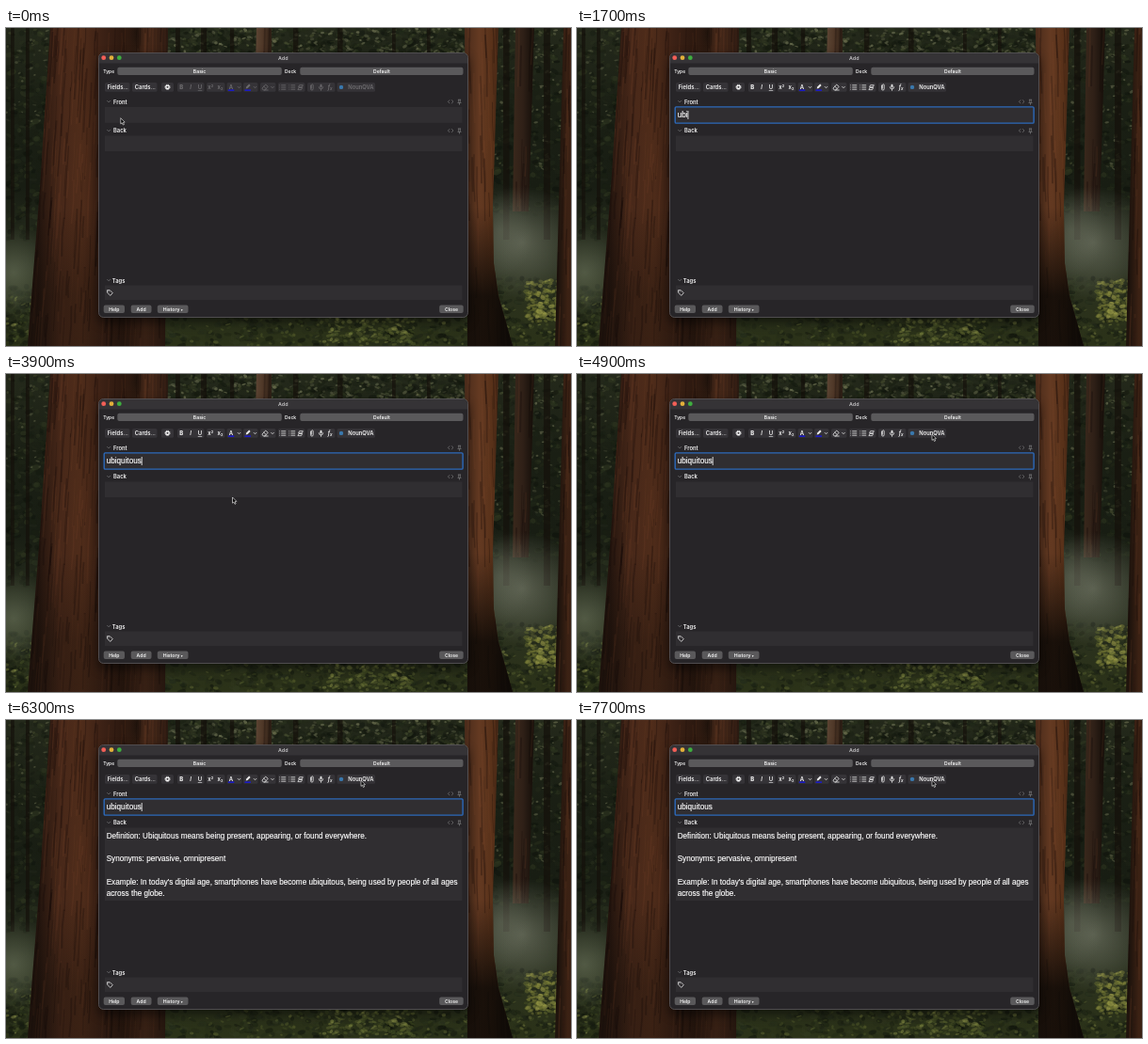
These frames come from a looping animation (600 by 338 pixels, 8 s). An HTML page with a canvas:

```html
<!DOCTYPE html>
<html lang="en">
<head>
<meta charset="utf-8">
<title>Add card</title>
<style>
  html, body { margin: 0; width: 100%; height: 100%; overflow: hidden; background: #171c12; }
  canvas, svg { position: absolute; left: 0; top: 0; width: 600px; height: 338px; }
  text { font-family: Inter, "Open Sans", sans-serif; font-weight: 600; fill: #f4f4f4; white-space: pre; }
  .small { font-size: 5.1px; }
  .label { font-size: 5.8px; }
  .mid { text-anchor: middle; }
  .edit { font-family: "Liberation Sans", Arial, sans-serif; font-weight: 400; font-size: 8.15px; fill: #fff; stroke: #fff; stroke-width: .15; }
  .line { fill: none; stroke: #e8e8e8; stroke-width: .8; stroke-linecap: round; stroke-linejoin: round; }
  .dim { stroke: #7c7b7d; stroke-width: .7; }
  .button { fill: #5a595b; }
  .tool { fill: #353337; }
  .field { fill: #302e31; }
</style>
</head>
<body>
<canvas id="forest" width="600" height="338"></canvas>
<svg viewBox="0 0 600 338" xmlns="http://www.w3.org/2000/svg">
  <defs>
    <filter id="shadow" x="-10%" y="-10%" width="120%" height="125%">
      <feGaussianBlur stdDeviation="6"/>
    </filter>
    <path id="section" class="line dim" d="M107.6 -2.9l1.5 1.5 1.5-1.5"/>
    <g id="fieldIcons" class="line dim">
      <path d="M471 -3.7l-1.6 1.6 1.6 1.6M473.4 -3.7l1.6 1.6-1.6 1.6"/>
      <path d="M480.3 -4.2h2.4M480.7 -4v2l-.9 1.2h3.4l-.9-1.2v-2M481.5 -.7v1.7"/>
    </g>
    <path id="drop" d="M-1.3 -.6L0 .7 1.3 -.6" class="line"/>
  </defs>

  <rect x="98" y="31" width="393" height="282" rx="6" fill="#000" opacity=".55" filter="url(#shadow)"/>
  <rect x="98.5" y="26.5" width="392" height="281" rx="5" fill="#272528" stroke="#5c5a5d" stroke-width=".8"/>
  <path d="M99 37.5V31.5a4.6 4.6 0 0 1 4.6-4.6H485.4a4.6 4.6 0 0 1 4.6 4.6V37.5z" fill="#353336"/>
  <circle cx="103.7" cy="31.7" r="2.4" fill="#f35f57"/>
  <circle cx="112" cy="31.7" r="2.4" fill="#e3b03a"/>
  <circle cx="120.3" cy="31.7" r="2.4" fill="#3fae3f"/>
  <text class="mid" x="294.3" y="33.9" font-size="5.3" style="fill:#c4c3c5">Add</text>

  <text x="103.3" y="47.8" font-size="4.9">Type</text>
  <text x="296" y="47.8" font-size="4.9">Deck</text>
  <g id="buttons"></g>

  <g id="toolBacks"></g>
  <text class="label" x="107.7" y="65.2">Fields...</text>
  <text class="label" x="136.8" y="65.2">Cards...</text>
  <circle cx="171.5" cy="62.8" r="1.7" fill="none" stroke="#fff" stroke-width="1.3"/>
  <circle cx="171.5" cy="62.8" r="2.6" fill="none" stroke="#fff" stroke-dasharray="1.02"/>

  <g id="tools">
    <g font-size="6">
      <text class="mid" x="186.2" y="65" style="font-weight:800">B</text>
      <text class="mid" x="196.2" y="65" font-style="italic">I</text>
      <text class="mid" x="206" y="65" text-decoration="underline">U</text>
      <text x="214.3" y="65.3">x<tspan dy="-2" font-size="4">2</tspan></text>
      <text x="224.5" y="64.8">x<tspan dy="1.3" font-size="4">2</tspan></text>
      <text class="mid" x="239" y="64.5">A</text>
      <text x="341.7" y="65" font-style="italic">f<tspan dy=".9" font-size="4.5">x</tspan></text>
    </g>
    <use href="#drop" x="247.5" y="63"/>
    <use href="#drop" x="264.5" y="63"/>
    <use href="#drop" x="283" y="63"/>
    <path d="M254.700 64.400l.5-1.800 3-3 1.400 1.400-3 3z" fill="#e8e8e8"/>
    <path class="line" d="M272.200 63.800l3.500-3.700 2.500 2.200-3.300 3.700h-1.300zM273.800 62.200l2.400 2.300M274.500 66h3.700"/>
    <path class="line" d="M292.600 60.800h4.200M292.600 63h4.200M292.600 65.200h4.200M302.800 60.800h4M302.800 63h4M302.800 65.200h4"/>
    <path class="line" d="M312 60.700h3.300l-1 2.100h-3.300zM311.300 63.500h3.300l-1 2.100h-3.300z"/>
    <path class="line" stroke-dasharray="0 2.200" d="M290.700 60.800v4.500M300.800 60.800v4.500"/>
    <path class="line" d="M323.500 61v3.700a1.300 1.300 0 0 0 2.700 0v-4a.9.900 0 0 0-1.800 0v3.600"/>
    <rect x="333.500" y="59.800" width="2" height="3.800" rx="1" fill="#e4e4e4"/>
    <path class="line" d="M332.300 62.700a2.200 2.200 0 0 0 4.400 0M334.500 65v1.300"/>
    <text class="label" x="363.3" y="65.1">NounQVA</text>
  </g>
  <path d="M235.800 66.200h6.500M253.500 66.200h6.500" stroke="#1414f0" stroke-width="1.200"/>
  <circle cx="356" cy="62.900" r="2.200" fill="#3a78ad"/>

  <use href="#section" y="80.300"/>
  <use href="#fieldIcons" y="80.400"/>
  <text class="label" x="114" y="80.500">Front</text>
  <rect class="field" x="105" y="84" width="379.500" height="16.800"/>
  <rect id="focusRing" x="104.200" y="83.900" width="380.900" height="17.200" rx="1.200" fill="none" stroke="#2c6abb" stroke-width="1.400"/>
  <text id="word" class="edit" x="106.700" y="95.300"></text>
  <rect id="caret" y="88" width=".8" height="9" fill="#fff"/>

  <use href="#section" y="111.200"/>
  <use href="#fieldIcons" y="111.200"/>
  <text class="label" x="114" y="111.200">Back</text>
  <rect id="backField" class="field" x="105" y="114.500" width="379.500"/>
  <g id="answer"></g>

  <use href="#section" y="270.200"/>
  <text class="label" x="112.800" y="270.500">Tags</text>
  <rect class="field" x="105" y="273.500" width="379.500" height="15.500"/>
  <path class="line" d="M107.800 278.700h2.500l3 3-2.600 2.700-2.900-3zM109 279.900h.1"/>

  <path id="mouse" d="M0 0V6.200L1.400 5l1.100 2.300 1.100-.5L2.600 4.600 4.400 4.400z" fill="#080808" stroke="#fff" stroke-width=".6" stroke-linejoin="round"/>
</svg>

<script>
const byId = id => document.getElementById(id);
const WORD = "ubiquitous";
const ANSWER = [
  [126, "Definition: Ubiquitous means being present, appearing, or found everywhere."],
  [150.3, "Synonyms: pervasive, omnipresent"],
  [174.6, "Example: In today's digital age, smartphones have become ubiquitous, being used by people of all ages"],
  [186.8, "across the globe."]
];
const LOOP = 8000, FOCUS = 600, TYPE_START = 1420, TYPE_STEP = 133, ANSWERED = 5800;
const TYPE_END = TYPE_START + TYPE_STEP * (WORD.length - 1);
const BLINK = 1060;

// Static window parts
const button = (x, y, w, label) =>
  `<rect class="button" x="${x}" y="${y}" width="${w}" height="8.4" rx="2"/>` +
  `<text class="small mid" x="${x + w / 2}" y="${y + 6.1}">${label}</text>`;
byId("buttons").innerHTML =
  button(118.3, 41.7, 174.5, "Basic") + button(312.3, 41.7, 173.2, "Default") +
  button(103.7, 294.5, 22.3, "Help") + button(132.7, 294.5, 21.8, "Add") +
  button(160.8, 294.5, 32.7, 'History <tspan font-size="3.5">▾</tspan>') +
  button(460.2, 294.5, 25.5, "Close");
byId("toolBacks").innerHTML = [[105, 26.5], [134, 26.5], [165, 13], [182, 28.5], [213, 19.5],
  [234.5, 16], [252, 15.5], [270, 16.5], [289, 28.5], [320, 29.5], [351.5, 40.5]]
  .map(([x, w]) => `<rect class="tool" x="${x}" y="58" width="${w}" height="9.8" rx="1.6"/>`).join("");
byId("answer").innerHTML = ANSWER
  .map(([y, line]) => `<text class="edit" x="106.7" y="${y}">${line}</text>`).join("");

function drawForest() {
  const ctx = byId("forest").getContext("2d");
  let seed = 41;
  const rand = (a = 0, b = 1) => {
    seed = (seed * 16807) % 2147483647;
    return a + (b - a) * seed / 2147483647;
  };
  const gradient = (x0, y0, x1, y1, colors) => {
    const g = ctx.createLinearGradient(x0, y0, x1, y1);
    colors.forEach((color, i) => g.addColorStop(i / (colors.length - 1), color));
    return g;
  };
  const leaves = (n, x, y, w, h, colors, size, alpha = .55) => {
    for (let i = 0; i < n; i++) {
      ctx.globalAlpha = alpha * rand(.3, 1);
      ctx.fillStyle = colors[Math.floor(rand(0, colors.length))];
      ctx.beginPath();
      ctx.ellipse(x + rand() * w, y + rand() * h, rand(.4, 1) * size, rand(.25, .6) * size, rand(-.6, .6), 0, 7);
      ctx.fill();
    }
    ctx.globalAlpha = 1;
  };
  const glow = (x, y, rx, ry, rgb, alpha) => {
    ctx.save();
    ctx.translate(x, y);
    ctx.scale(rx, ry);
    const g = ctx.createRadialGradient(0, 0, 0, 0, 0, 1);
    g.addColorStop(0, `rgba(${rgb},${alpha})`);
    g.addColorStop(1, `rgba(${rgb},0)`);
    ctx.fillStyle = g;
    ctx.fillRect(-1, -1, 2, 2);
    ctx.restore();
  };
  // Each row is [y, left, right]; bark streaks follow the two edges.
  const trunk = (rows, shades, streaks, shade = 0) => {
    const shape = new Path2D();
    rows.forEach(([y, l]) => shape.lineTo(l, y));
    [...rows].reverse().forEach(([y, , r]) => shape.lineTo(r, y));
    shape.closePath();
    const [top, last] = [rows[0], rows[rows.length - 1]];
    ctx.save();
    ctx.fillStyle = gradient((top[1] + last[1]) / 2, 0, (top[2] + last[2]) / 2, 0, shades);
    ctx.fill(shape);
    ctx.clip(shape);
    for (let i = 0; i < streaks; i++) {
      const u = rand(), from = rand(-40, 310), length = rand(20, 80);
      const at = y => {
        const k = (y - top[0]) / (last[0] - top[0]);
        const l = top[1] + (last[1] - top[1]) * k, r = top[2] + (last[2] - top[2]) * k;
        return l + (r - l) * u;
      };
      ctx.strokeStyle = rand() < .6 ? "rgba(14,7,4,.26)" : "rgba(140,82,48,.13)";
      ctx.lineWidth = rand(.5, 2);
      ctx.beginPath();
      ctx.moveTo(at(from), from);
      ctx.lineTo(at(from + length / 2) + rand(-1, 1), from + length / 2);
      ctx.lineTo(at(from + length), from + length);
      ctx.stroke();
    }
    ctx.fillStyle = gradient(0, 190, 0, 285, ["rgba(12,9,6,0)", `rgba(12,9,6,${shade})`]);
    ctx.fillRect(0, 0, 600, 338);
    ctx.restore();
  };

  ctx.fillStyle = gradient(0, 0, 0, 338, ["#24291b", "#1a1f14", "#181d13", "#2a3020", "#2b3218"]);
  ctx.fillRect(0, 0, 600, 338);
  const dark = ["#0c100a", "#12170e", "#191f13"];
  const green = ["#262d1a", "#323a22", "#20271a"];
  const pale = ["#686c4e", "#858864", "#545c38"];
  const fern = ["#6c7436", "#868c46", "#4c5728"];

  // Distant stems and canopy
  leaves(320, 0, 0, 50, 225, [...dark, ...green], 5);
  leaves(60, 0, 0, 46, 105, pale, 2.5, .5);
  leaves(450, 168, 0, 322, 28, [...dark, ...green], 5);
  leaves(260, 172, 0, 315, 28, pale, 2.8, .6);
  leaves(420, 512, 0, 88, 200, [...dark, ...green], 5);
  leaves(150, 518, 0, 80, 150, pale, 2.6, .5);
  for (const x of [5, 21, 180, 207, 238, 305, 352, 410, 447, 528, 571]) {
    ctx.fillStyle = "rgba(20,16,11,.7)";
    ctx.fillRect(x, 0, rand(3, 7), 225);
  }
  trunk([[0, 266, 282], [40, 265, 282]], ["#5b4433", "#4d3626", "#2c1f15"], 10);
  trunk([[0, 541, 561], [195, 538, 555]], ["#38271b", "#2f2017", "#1a120c"], 25);

  // Ground, ferns and mist
  leaves(160, 0, 275, 40, 63, [...dark, ...green], 5);
  leaves(35, 0, 285, 35, 53, fern, 3);
  leaves(330, 165, 306, 345, 32, [...dark, ...green], 5);
  leaves(110, 185, 306, 310, 32, fern, 3, .45);
  leaves(130, 330, 308, 105, 26, fern, 3.5);
  leaves(230, 505, 265, 95, 73, [...dark, ...green], 5);
  leaves(70, 520, 295, 80, 43, fern, 3, .5);
  glow(8, 260, 45, 48, "125,134,108", .48);
  glow(548, 228, 62, 60, "142,146,128", .5);
  glow(525, 215, 35, 50, "125,130,112", .3);
  leaves(130, 552, 268, 34, 44, ["#8b8d3c", "#a5a54e", "#6b7230"], 4);

  trunk([[0, 47, 172], [170, 36, 170], [338, 23, 169]],
    ["#24150e", "#482819", "#4f2c1a", "#3c2115", "#2b180f", "#492a1a", "#2e1b12"], 280, .3);
  glow(138, 5, 10, 40, "15,10,6", .6);
  trunk([[0, 487, 523], [190, 489, 517], [250, 490, 518], [285, 490, 523], [338, 490, 538]],
    ["#4c2c1b", "#643a22", "#583119", "#21130c"], 90, .85);
  trunk([[0, 592, 606], [338, 583, 606]], ["#20140d", "#3c2214", "#311c11"], 40);
}

const ease = k => k < .5 ? 2 * k * k : 1 - 2 * (1 - k) ** 2;
const progress = (t, from, to) => ease(Math.min(1, Math.max(0, (t - from) / (to - from))));

// Rest at the front field, dip into the empty area, then rise to the toolbar.
function mousePosition(t) {
  const [a, b, c] = [[121.8, 95.7], [240.5, 131], [377, 64.2]];
  const [from, to, k] = t < 3900 ? [a, b, progress(t, 3150, 3900)] : [b, c, progress(t, 3950, 4750)];
  return from.map((v, i) => v + (to[i] - v) * k);
}

const show = (el, on) => el.setAttribute("visibility", on ? "visible" : "hidden");
const parts = {};
for (const id of ["tools", "focusRing", "word", "caret", "backField", "answer", "mouse"]) parts[id] = byId(id);

function render(t) {
  const focused = t >= FOCUS, answered = t >= ANSWERED;
  const count = Math.max(0, Math.min(WORD.length, Math.floor((t - TYPE_START) / TYPE_STEP) + 1));
  const typing = t >= TYPE_START && t < TYPE_END;
  const blinkStart = t < TYPE_START ? FOCUS : TYPE_END;
  const caretOn = focused && (typing || (t - blinkStart) % BLINK < BLINK / 2);

  parts.tools.setAttribute("opacity", focused ? 1 : .3);
  show(parts.focusRing, focused);
  parts.word.textContent = WORD.slice(0, count);
  parts.caret.setAttribute("x", 106.7 + (count ? parts.word.getComputedTextLength() : 0));
  show(parts.caret, caretOn);
  parts.backField.setAttribute("height", answered ? 77.5 : 16.5);
  show(parts.answer, answered);
  show(parts.mouse, t < TYPE_START || t >= 3150);
  parts.mouse.setAttribute("transform", `translate(${mousePosition(t)})`);
}

drawForest();
const start = performance.now();
function tick() {
  render((performance.now() - start) % LOOP);
  requestAnimationFrame(tick);
}
tick();
</script>
</body>
</html>
```
